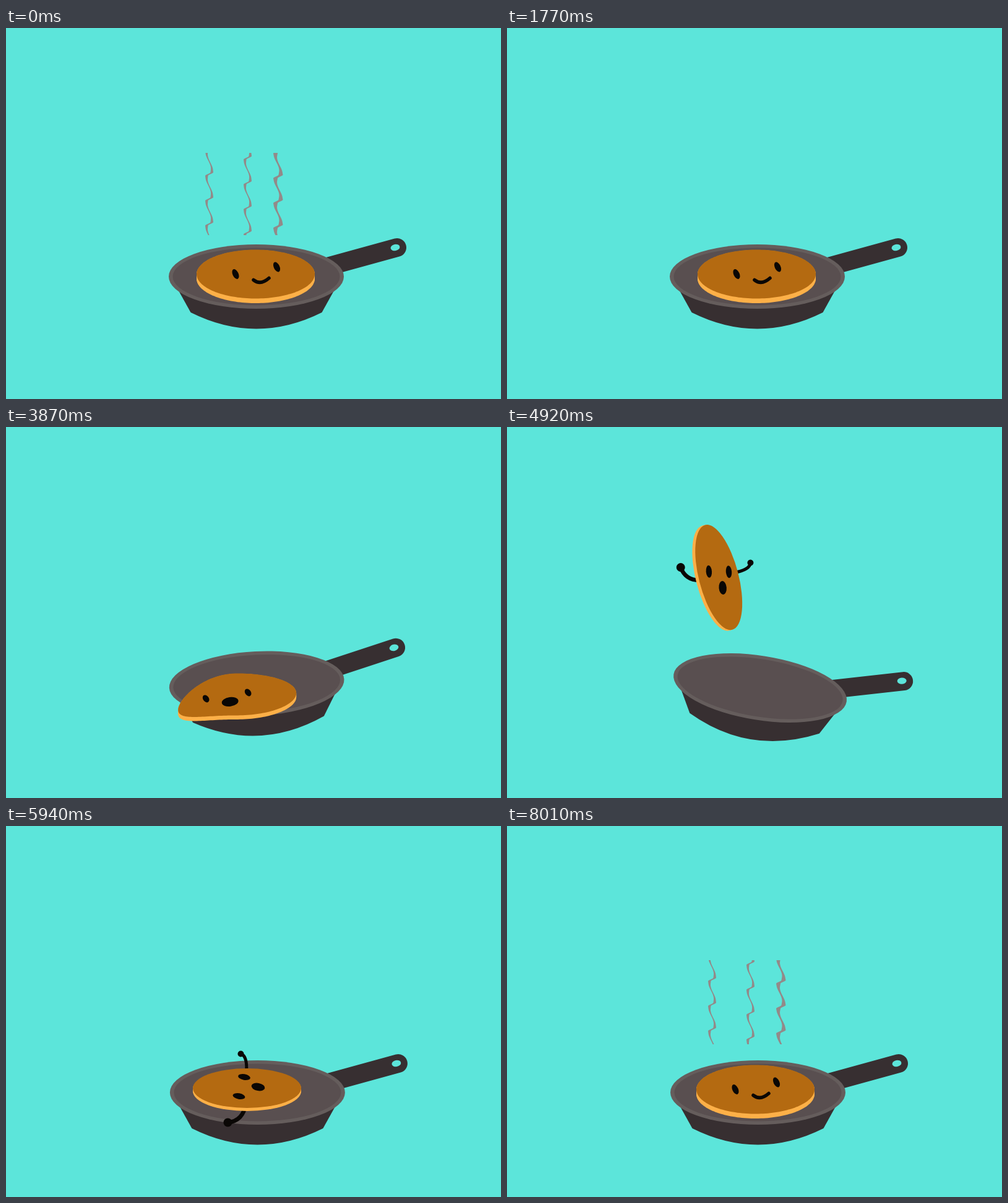
These frames come from a looping animation (800 px wide and 600 px high, 8040 ms). An HTML page with a canvas:

```html
<!DOCTYPE html>
<html lang="en">
<head>
<meta charset="utf-8">
<title>Pancake flip</title>
<style>
html, body { margin: 0; width: 100%; height: 100%; overflow: hidden; background: #5ce5da; }
canvas { display: block; }
</style>
</head>
<body>
<canvas id="stage" width="800" height="600"></canvas>
<script>
const c = document.getElementById('stage').getContext('2d');
const LOOP = 8040, LAUNCH = 4659, LAND = 5859, SETTLE = 6120;
const BG = '#5ce5da', IRON = '#372f31', RIM = '#655d5c', FLOOR = '#594f50';
const TOP = '#b46a11', EDGE = '#fdb048', BLACK = '#0a0705', STEAM = '#928a89';
const PERIOD = 40.3, HOOK = .86;
const STRANDS = [
  { x: 322, width: 4.5, hook: 239 },
  { x: 384, width: 4.5, hook: 253 },
  { x: 432, width: 7, hook: 243 }
];

const mix = (a, b, k) => a + (b - a) * k;
const clamp = v => Math.max(0, Math.min(1, v));
const smooth = v => { v = clamp(v); return v * v * (3 - 2 * v); };
const ramp = (t, from, to) => smooth((t - from) / (to - from));
const bump = (t, peak, half) => Math.cos(Math.PI / 2 * Math.min(1, Math.abs(t - peak) / half)) ** 2;

// Swings right, left and right again, dips, then throws and catches.
function panPose(t) {
  return {
    x: 28 * bump(t, 2440, 500) - 70 * bump(t, 2950, 394) + 7 * bump(t, 3550, 400)
      - 5 * bump(t, 4450, 400) + 37 * bump(t, 5400, 600) + ramp(t, 4000, 4900),
    y: 15 * bump(t, 2950, 560) + 29 * ramp(t, 3500, 4300) - 9 * bump(t, 4920, 350),
    angle: 9 * bump(t, 4910, 450) - 3.1 * bump(t, 3750, 650)
  };
}

function lyingPose(t, pan) {
  if (t >= SETTLE) return { x: 401.5, y: 429.5, bend: 0 };
  const bend = ramp(t, 2050, 2700), slide = ramp(t, 2850, 3800), lift = ramp(t, 4000, LAUNCH);
  return {
    x: 403.5 + pan.x - 46 * bend + 15.5 * slide - 40 * lift,
    y: 401.5 + pan.y + 3.5 * bend + 19 * slide - 22 * lift,
    bend
  };
}

function oval(x, y, rx, ry, color, deg = 0) {
  c.fillStyle = color;
  c.beginPath();
  c.ellipse(x, y, rx, ry, deg * Math.PI / 180, 0, 7);
  c.fill();
}

function stroke(path, width, color) {
  c.lineWidth = width;
  c.lineCap = 'round';
  c.strokeStyle = color;
  c.stroke(new Path2D(path));
}

function polygon(points, color) {
  c.beginPath();
  points.forEach(p => c.lineTo(...p));
  c.fillStyle = color;
  c.fill();
}

function at(x, y, deg, draw) {
  c.save();
  c.translate(x, y);
  c.rotate(deg * Math.PI / 180);
  draw();
  c.restore();
}

function pan() {
  stroke('M95 -10.5 L227.5 -47', 30, IRON);
  oval(224.5, -47, 7.5, 5.2, BG, -12);
  c.fillStyle = IRON;
  c.fill(new Path2D('M-126 22 L-106 58 Q0 111 106 58 L126 22 Z'));
  oval(0, 0, 141.5, 52, RIM);
  oval(0, 0, 135, 46.5, FLOOR);
}

// An ellipse whose left half sags as it bends over the rim.
function slab(bend, dy, color) {
  const points = [];
  for (let a = 0; a < 2 * Math.PI; a += .04) {
    const u = Math.cos(a), sag = (u < 0 ? 25 : -2) * u * u - 1;
    points.push([95.5 * u, 39.5 * (1 - .14 * bend) * Math.sin(a) - 3.5 + bend * sag + dy]);
  }
  polygon(points, color);
}

function lyingPancake(bend) {
  for (let dy = 7.5 - bend; dy > 0; dy--) slab(bend, dy, EDGE);
  slab(bend, 0, TOP);
  const tilt = mix(-25, -35, bend), ry = mix(8.5, 6.5, bend);
  oval(mix(-32.5, -50.5, bend), mix(-3.5, 2.5, bend), 4.7, ry, BLACK, tilt);
  oval(mix(34, 17.5, bend), mix(-15, -7.5, bend), 4.7, ry, BLACK, tilt);
  if (bend > .5) oval(-11.5, 7.5, 13.5, 7.5, BLACK, -8);
  else at(-19 * bend, 2 * bend, 0, () => stroke('M-3.5 6 Q8 15 21.5 3', 5.5, BLACK));
}

function flyingPancake() {
  stroke('M-25 -2 Q-53 -6 -55.5 -31', 6.5, BLACK);
  oval(-55.5, -31, 7, 7, BLACK);
  stroke('M25 -1 Q52 1 55.5 -10', 5, BLACK);
  oval(55.5, -10, 5, 5, BLACK);
  for (let dx = 5; dx > 0; dx--) oval(-dx, 0, 32, 87.5, EDGE);
  oval(0, 0, 32, 87.5, TOP);
  oval(-13, -13, 4.7, 10, BLACK, 10);
  oval(18, -4.5, 4.7, 10, BLACK, 10);
  oval(2, 18, 6.2, 11, BLACK, 10);
}

// Each wave drifts right as it descends, then hooks sharply back left.
function strand(x, width, top, bottom, hook) {
  const left = [], right = [];
  for (let y = top; y <= bottom; y += .5) {
    const q = (y - hook) / PERIOD, p = q - Math.floor(q);
    const sway = p < HOOK ? ramp(p, .1, .75) : 1 - ramp(p, HOOK, 1);
    const w = width * (1 - .6 * Math.sin(Math.PI * Math.min(1, p / HOOK)));
    const mid = x + width / 2 + 8.5 * sway;
    left.push([mid - w / 2, y]);
    right.unshift([mid + w / 2, y]);
  }
  polygon(left.concat(right), STEAM);
}

function steam(t) {
  const s = t / 1000, leaving = t < 1650;
  if (!leaving && t < 5970) return;
  const rise = 28.4 * s + 9.1 * s * s, grown = ramp(t, 5970, 6450);
  c.globalAlpha = leaving ? 1 - clamp((t - 1000) / 650) : 1;
  for (const { x, width, hook } of STRANDS) {
    if (leaving) strand(x, width, 202 - rise, 335 - rise, hook - rise);
    else strand(x + 3, width, mix(353, 217, grown), 353, hook + 12 + 36 * (8.01 - s));
  }
  c.globalAlpha = 1;
}

function draw(t) {
  const p = panPose(t);
  c.fillStyle = BG;
  c.fillRect(0, 0, 800, 600);
  at(404.5 + p.x, 402 + p.y, p.angle, pan);
  steam(t);
  if (t >= LAUNCH && t < SETTLE) {
    const u = clamp((t - LAUNCH) / (LAND - LAUNCH));
    at(mix(329, 389.5, u), 424 - 4 * 265 * u * (1 - u), mix(-94, 270, u), flyingPancake);
  } else {
    const { x, y, bend } = lyingPose(t, p);
    at(x, y, 0, () => lyingPancake(bend));
  }
}

const start = performance.now();
function tick() {
  draw((performance.now() - start) % LOOP);
  requestAnimationFrame(tick);
}
tick();
</script>
</body>
</html>
```
